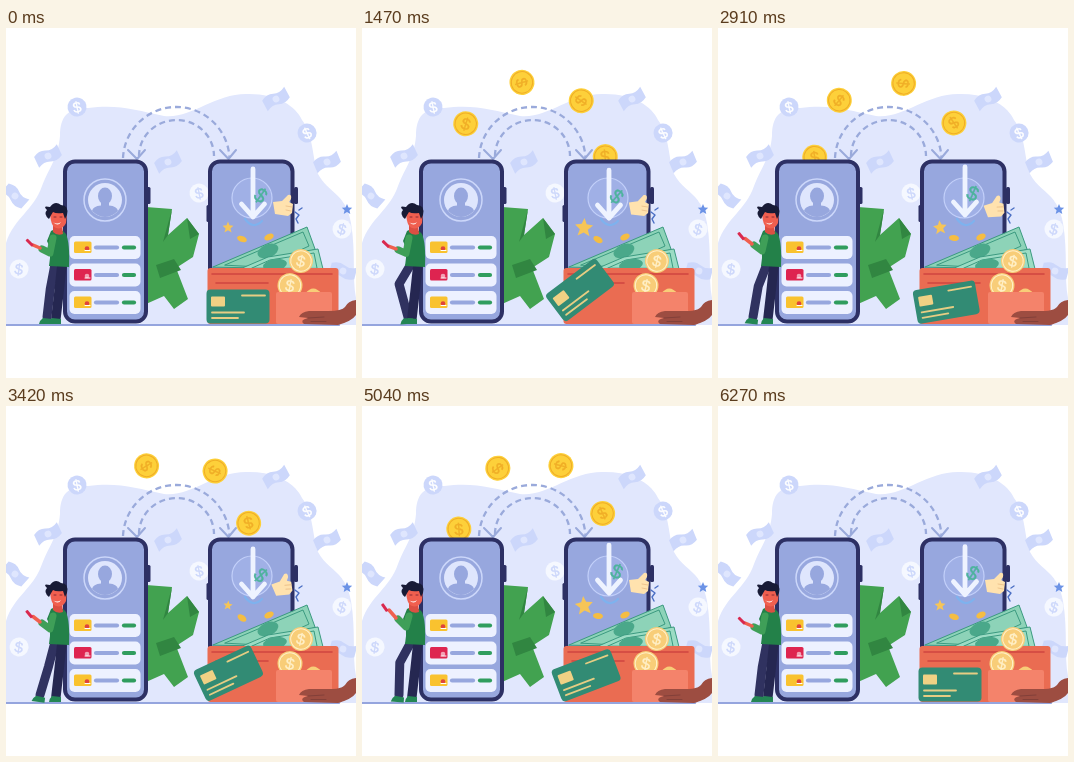
Write an HTML page that moves like this. It is 350 by 350 pixels and loops after 6.3 s.

```html
<!DOCTYPE html>
<html lang="en">
<head>
<meta charset="utf-8">
<title>Money transfer</title>
<style>
html, body { margin: 0; width: 100%; height: 100%; overflow: hidden; background: #fff }
svg { display: block; width: 100vw; height: 100vh }
text { font-family: "Liberation Sans", Arial, sans-serif; text-anchor: middle }
</style>
</head>
<body>
<svg id="stage" viewBox="0 0 350 350" fill="none" stroke-linecap="round" stroke-linejoin="round"></svg>
<script>
const LOOP = 6300, INK = '#2d3064', SCREEN = '#97a7de', PALE = '#e1e7fd', GHOST = '#ccd7fb';
const stage = document.getElementById('stage');

const rect = (x, y, w, h, r, fill, more = '') =>
  `<rect x="${x}" y="${y}" width="${w}" height="${h}" rx="${r}" fill="${fill}" ${more}/>`;
const path = (d, fill, more = '') => `<path d="${d}" fill="${fill}" ${more}/>`;
const line = (d, color, width, more = '') =>
  `<path d="${d}" stroke="${color}" stroke-width="${width}" ${more}/>`;
const disc = (x, y, r, fill, more = '') => `<circle cx="${x}" cy="${y}" r="${r}" fill="${fill}" ${more}/>`;
const place = (x, y, turn, body, id = '') =>
  `<g ${id && `id="${id}"`} transform="translate(${x} ${y}) rotate(${turn})">${body}</g>`;

const dollar = (size, color) =>
  `<text y="${size * .36}" font-size="${size}" fill="${color}" stroke="${color}" stroke-width=".4">$</text>`;
const coin = (r, fill, mark, sign = mark) => disc(0, 0, r, fill) +
  disc(0, 0, r * .86, 'none', `stroke="${mark}" stroke-width="1"`) + dollar(r * 1.3, sign);
const ghostCoin = ([x, y, turn, fill, mark]) => place(x, y, turn, disc(0, 0, 9.5, fill) + dollar(15, mark));
const ghostBill = ([x, y, turn]) => place(x, y, turn,
  path('M-13-5Q-6-9 0-6T13-7V5Q6 9 0 6T-13 7Z', GHOST) + disc(0, 0, 3.4, '#dfe6fe'));

const backdrop =
  path(`M0 297V215C8 190 28 182 36 158C44 138 52 130 54 108C54 88 62 80 82 80C112 76 130 82 158 88
    C185 91 208 66 240 66C270 65 290 78 296 92C308 108 306 130 312 146C322 165 340 165 345 195
    C350 225 346 250 350 270V297Z`, PALE) +
  [[42, 128, -25], [270, 71, -28], [162, 134, -25], [9, 168, 42], [321, 134, -22], [337, 243, 15]].map(ghostBill).join('') +
  [[71, 79, -12, GHOST, '#fff'], [301, 105, -25, GHOST, '#fff'], [13, 241, 8, '#f5f8ff', GHOST],
    [193, 165, -12, '#f5f8ff', GHOST], [336, 201, 15, '#f5f8ff', GHOST]].map(ghostCoin).join('') +
  path('M341 176l1.5 3.4 3.7.3-2.8 2.5.9 3.7-3.3-2-3.3 2 .9-3.7-2.8-2.5 3.7-.3Z', '#6c93e6');

const DASH = 'stroke-dasharray="6 4" stroke-linecap="butt"';
const arcs =
  line('M117 130A53.3 53.3 0 0 1 223.5 130', '#9aaadb', 2.3, DASH) +
  line('M133 128A37.5 36 0 0 1 208 128', '#9aaadb', 2.3, DASH) +
  line('M122 122L131 131L139 122M214 122L222.5 131L230 122', '#9aaadb', 2);

const phone = (x, w) => rect(x, 133.5, w, 160, 10, SCREEN, `stroke="${INK}" stroke-width="4"`);
const button = (x, y) => rect(x, y, 4, 17, 1.5, INK);

const row = (y, color, patch) =>
  rect(63.5, y, 71, 23, 5, '#edf1ff') + rect(68, y + 5.5, 17.5, 11.5, 1.5, color) +
  disc(81, y + 12.5, 2.3, patch) + line(`M79 ${y + 14.5}h5`, '#fff', 1) +
  line(`M90 ${y + 11.5}h21`, SCREEN, 4.2) + line(`M118 ${y + 11.5}h10`, '#309d5e', 4.2);

const greenNotes =
  path('M140 179L166 181L162 207L181 190L193 206L187 229L170 240L182 271L168 281L158 268L140 276Z', '#42a250') +
  path('M150 237L168 231L175 242L154 250ZM181 190L193 206L184 211ZM166 181L162 207L157 214Z', '#318641');

const leftPhone = button(140.5, 159) + phone(59, 81) +
  disc(99, 172, 21, 'none', 'stroke="#ccd7fa" stroke-width="1.5"') +
  disc(99, 172, 17, '#dfe6fd') +
  path('M86 183Q87 178 95 177.5V173H103V177.5Q111 178 112 183Q99 195 86 183Z', SCREEN) +
  `<ellipse cx="99" cy="168" rx="7" ry="8.5" fill="${SCREEN}"/>` +
  row(208, '#f9c22f', '#e0443c') + row(235.5, '#de2450', '#f3a0b4') + row(263, '#f9c22f', '#e0443c');

const rightPhone = button(288, 159) + button(200.5, 177) + phone(204, 82.5) +
  disc(246, 170, 20, '#a0b0e6', 'stroke="#c3d0fa" stroke-width="1.2"') +
  line('M239 191Q247 202 256 193', '#7eb2ee', 2.2) +
  place(247, 190, 0, line('M0-48V0M-11.5-13L0 0L11.5-13', '#eef3ff', 4.8), 'arrow') +
  place(255, 167, 35, dollar(20, '#4db39d'), 'dollar') +
  place(222, 199, 0, path('M0-9L2.5-3L9-2L4 2.5L6 9L0 5.5L-6 9L-4 2.5L-9-2L-2.5-3Z', '#f6c557'), 'star') +
  place(236, 211, 20, '<ellipse rx="5" ry="3" fill="#f5bd42"/>', 'bit') +
  place(263, 209, -25, '<ellipse rx="5" ry="3" fill="#f5bd42"/>') +
  place(277, 178, 0,
    path('M-10-4L-1-5L5-11Q9-12 8-7L6-4L10-2L9 7L5 10L-8 8Z', '#ffe2ae') +
    line('M3 0L9 1M3 4L8 5', '#eabd86', .8), 'thumb') +
  line('M289 184l4 3-3 4 2 4M293 182l3-2', '#4b6fc4', 1.4);

const EDGE = 'stroke="#3b9a80" stroke-width="1"';
const paperNotes =
  path('M207 239L301 199L309 221L268 240Z', '#8dd3b8', EDGE) +
  path('M219 237L297 204L303 218L258 239Z', 'none', EDGE) +
  '<ellipse cx="262" cy="223" rx="11" ry="6.5" fill="#4aa88a" transform="rotate(-23 262 223)"/>' +
  path('M234 241L262 229L312 221L317 241Z', '#9cdcc4', EDGE) +
  path('M246 240L264 232L308 225L311 240Z', 'none', EDGE) +
  '<ellipse cx="269" cy="237" rx="12" ry="6" fill="#4aa88a" transform="rotate(-9 269 237)"/>';

const wallet = paperNotes +
  rect(201.5, 240, 131, 56, 3, '#ea6c52') +
  line('M206 246H326M210 255H262', '#cf4440', 1.6) +
  place(295, 233, 12, coin(12, '#f8cd78', '#fff0c8')) +
  place(284, 257.5, 10, coin(12.5, '#f8cd78', '#fff0c8')) +
  path('M299 266Q307 255 316 266Z', '#f8cd78') +
  rect(270, 264, 56, 32, 2, '#f4836b') +
  path('M350 272Q342 273 339 279Q336 283 322 283H303Q295 284 293 289L302 290Q293 292 298 296L332 297Q346 293 350 287Z', '#9d4d41') +
  line('M302 290L318 289M305 293.5H320', '#7b3d38', .8);

const card =
  rect(-31.5, -17, 63, 34, 4, '#328b74') + rect(-27, -10, 14, 10, 1, '#f0d184') +
  line('M4-11H27M-26 6H6M-26 11.5H0', '#e6cd83', 1.8);

const man =
  '<path id="leg" stroke="#303260" stroke-width="9"/>' +
  line('M56 236L53 264L50 290', '#252751', 9.5) +
  place(40, 292, 0, path('M-3-2L6-1V4H-7Q-6 0-3-2Z', '#248654'), 'shoe') +
  path('M46 290L55 291V296H43Q43 293 46 290Z', '#248654') +
  path('M45 203Q53 198 60 206Q64 215 63 239L43 238Q46 221 41 213Z', '#238149') +
  path('M47 195L56 196L57 206Q51 208 47 204Z', '#dc4f43') +
  path('M44 182Q52 177 61 183L60 195Q57 202 50 200Q44 198 44 182Z', '#f05f4f') +
  path('M43 191Q37 186 41 182Q36 177 44 179Q49 172 55 177Q63 177 61 187L59 191L57 185Q50 186 47 184Q45 187 43 191Z', '#181b36') +
  line('M48 189h2M54 189h2', '#8a2b34', 1) + path('M47 194Q51 197 55 194Q52 199 47 194Z', '#fff') +
  '<path id="sleeve" stroke="#3f9f58" stroke-width="7"/><path id="forearm" stroke="#f05f4f" stroke-width="3.5"/>' +
  place(25, 216, -35, rect(-1.5, -5, 3, 9, .8, '#d9294f'), 'device');

// Moments at which a coin leaves the left side, in ms.
const departures = [100, 305, 515, 725, 927, 1133, 1367, 1617, 1867, 2071, 2277, 2490, 2712, 2918,
  3148, 3530, 3734, 3944, 4157, 4364, 4575, 4785, 5028];
const SPEED = .243;

stage.innerHTML = backdrop + arcs +
  departures.map((_, i) => place(0, 0, 0, coin(12.5, '#fdd03a', '#f0ae27'), 'coin' + i)).join('') +
  greenNotes + line('M0 297H333', '#95a5de', 2.2) + leftPhone + rightPhone + wallet +
  place(232, 278, 0, card, 'card') + man;

const $ = id => document.getElementById(id);
const move = (id, x, y, turn = 0, size = 1) =>
  $(id).setAttribute('transform', `translate(${x} ${y}) rotate(${turn}) scale(${size})`);

// Eased value from a list of time, value pairs.
function key(t, ...pairs) {
  for (let i = 2; i < pairs.length; i += 2) {
    const [t0, v0, t1, v1] = pairs.slice(i - 2, i + 2);
    if (t < t1) return v0 + (v1 - v0) * (1 - Math.cos(Math.PI * (t - t0) / (t1 - t0))) / 2;
  }
  return pairs[pairs.length - 1];
}

function draw() {
  const t = performance.now() % LOOP;

  departures.forEach((start, i) => {
    const angle = (t - start) * SPEED, a = angle * Math.PI / 180;
    $('coin' + i).style.display = angle > -14 && angle < 194 ? '' : 'none';
    move('coin' + i, 170 - 73.3 * Math.cos(a), 127 - 73.3 * Math.sin(a), angle - 8);
  });

  const tilt = key(t, 0, 0, 1450, 1, 2550, .15, 4050, 1, 4350, 1, 5850, 0);
  move('card', 232 - 14 * tilt, 278.5 - 16.5 * tilt, -37 * tilt);

  const bend = key(t, 0, .1, 1300, 1, 2400, .9, 3420, .3, 4350, .3, 5040, .9, 6270, .1);
  const footX = key(t, 0, 40, 1470, 45, 2400, 35, 3420, 33, 4350, 35, 5040, 36, 6270, 40);
  $('leg').setAttribute('d', `M49 236L${45 - 8 * bend} ${262 - 6 * bend}L${footX + 1} 289`);
  move('shoe', footX, 292, 40 - footX);

  const lift = key(t, 0, 0, 1470, -.1, 2400, .5, 3420, .5, 4350, .9, 5040, 1, 5900, 0);
  const handY = 217 - 13 * lift;
  $('sleeve').setAttribute('d', `M47 210L44 ${225 - 4 * lift}L36 ${221 - 8 * lift}`);
  $('forearm').setAttribute('d', `M34 ${220 - 8 * lift}L27 ${handY}`);
  move('device', 24 - lift, handY - 2, -45 + 10 * lift);

  const bob = Math.sin(t / LOOP * Math.PI * 12);
  move('arrow', 247, 189 + 2 * bob);
  move('dollar', 255, 167 + 2 * bob, 35 + 12 * bob);
  move('star', 222, 199, 6 * bob, key(t, 0, .6, 1470, 1, 2400, 1, 3420, .5, 5040, 1, 6270, .6));
  move('bit', 236, 211 + bob, 20 + 15 * bob);
  const nod = key(t, 0, 0, 1470, .1, 2400, .7, 3420, 1, 4200, 0);
  move('thumb', 277 - nod, 178 + 2 * nod, -14 * nod);

  requestAnimationFrame(draw);
}
draw();
</script>
</body>
</html>
```
